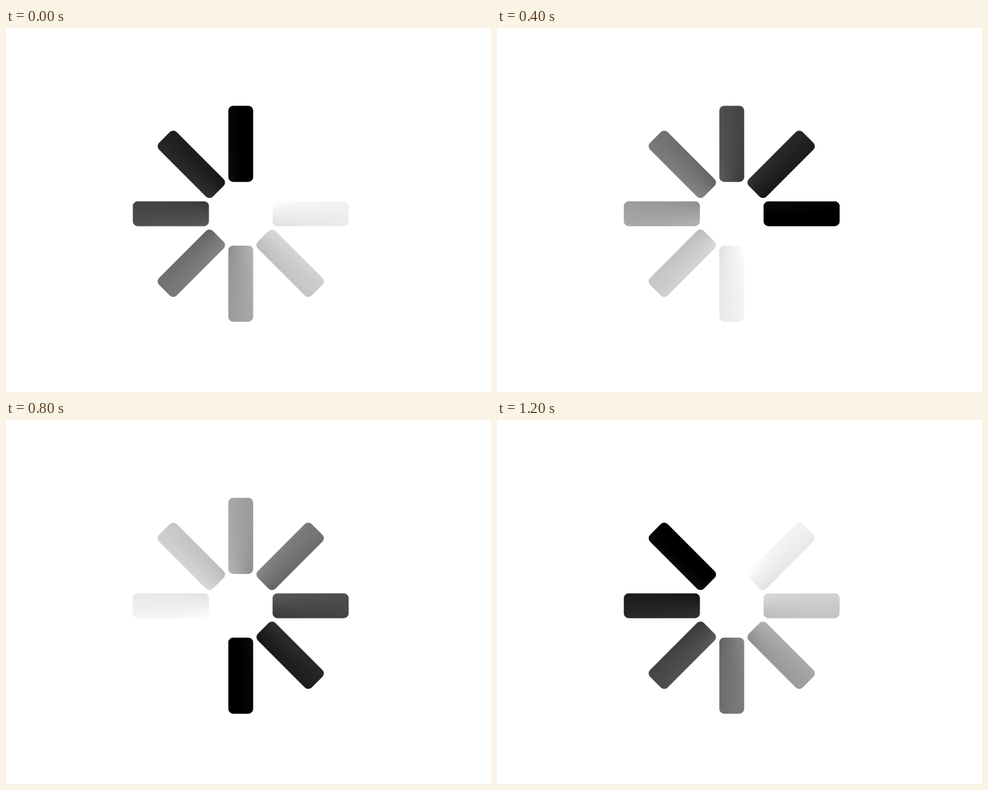
An HTML page with a canvas that plays this animation: 800 px wide and 600 px high, repeating every 1.4 s.

```html
<!DOCTYPE html>
<html lang="en">
<head>
<meta charset="utf-8">
<title>Spinner</title>
<style>
html, body { margin: 0; width: 100%; height: 100%; overflow: hidden; background: #fff; }
canvas { display: block; }
</style>
</head>
<body>
<canvas id="stage" width="800" height="600"></canvas>
<script>
const ctx = document.getElementById('stage').getContext('2d');
const STEP = 200, STEPS = 7, SLOTS = 8;
const CX = 387.2, CY = 306.2;
const INNER = 52.5, LENGTH = 125.5, WIDTH = 41, RADIUS = 8;
const EIGHTH = Math.PI / 4;
const FADE = 292; // degrees from black to white
const STOPS = 72;

// Grey for an angle in degrees behind the darkest bar, with a slight S-curve.
function grey(angle) {
  const u = Math.min(1, Math.max(0, angle / FADE));
  const level = Math.round(255 * (u - 0.023 * Math.sin(2 * Math.PI * u)));
  return `rgb(${level},${level},${level})`;
}

// The gradient's seam lies in the empty slot just ahead of the darkest bar.
const sweep = ctx.createConicGradient(EIGHTH - Math.PI / 2, 0, 0);
for (let i = 0; i <= STOPS; i++) {
  sweep.addColorStop(i / STOPS, grey(315 - 360 * i / STOPS));
}

function draw(time) {
  const step = Math.floor(time / STEP) % STEPS;
  const turn = step < STEPS - 1 ? step : SLOTS - 1; // the last step skips a slot
  ctx.setTransform(1, 0, 0, 1, 0, 0);
  ctx.fillStyle = '#fff';
  ctx.fillRect(0, 0, 800, 600);

  ctx.translate(CX, CY);
  ctx.rotate(turn * EIGHTH);
  ctx.fillStyle = sweep;
  ctx.beginPath();
  for (let slot = 0; slot < SLOTS; slot++) {
    if (slot !== 1) ctx.roundRect(-WIDTH / 2, -INNER - LENGTH, WIDTH, LENGTH, RADIUS);
    ctx.rotate(EIGHTH);
  }
  ctx.fill();
}

// Bars are rotated into place on the path, so the fill uses the final (full-turn) rotation.
const start = performance.now();
function tick() {
  draw(performance.now() - start);
  requestAnimationFrame(tick);
}
tick();
</script>
</body>
</html>
```
